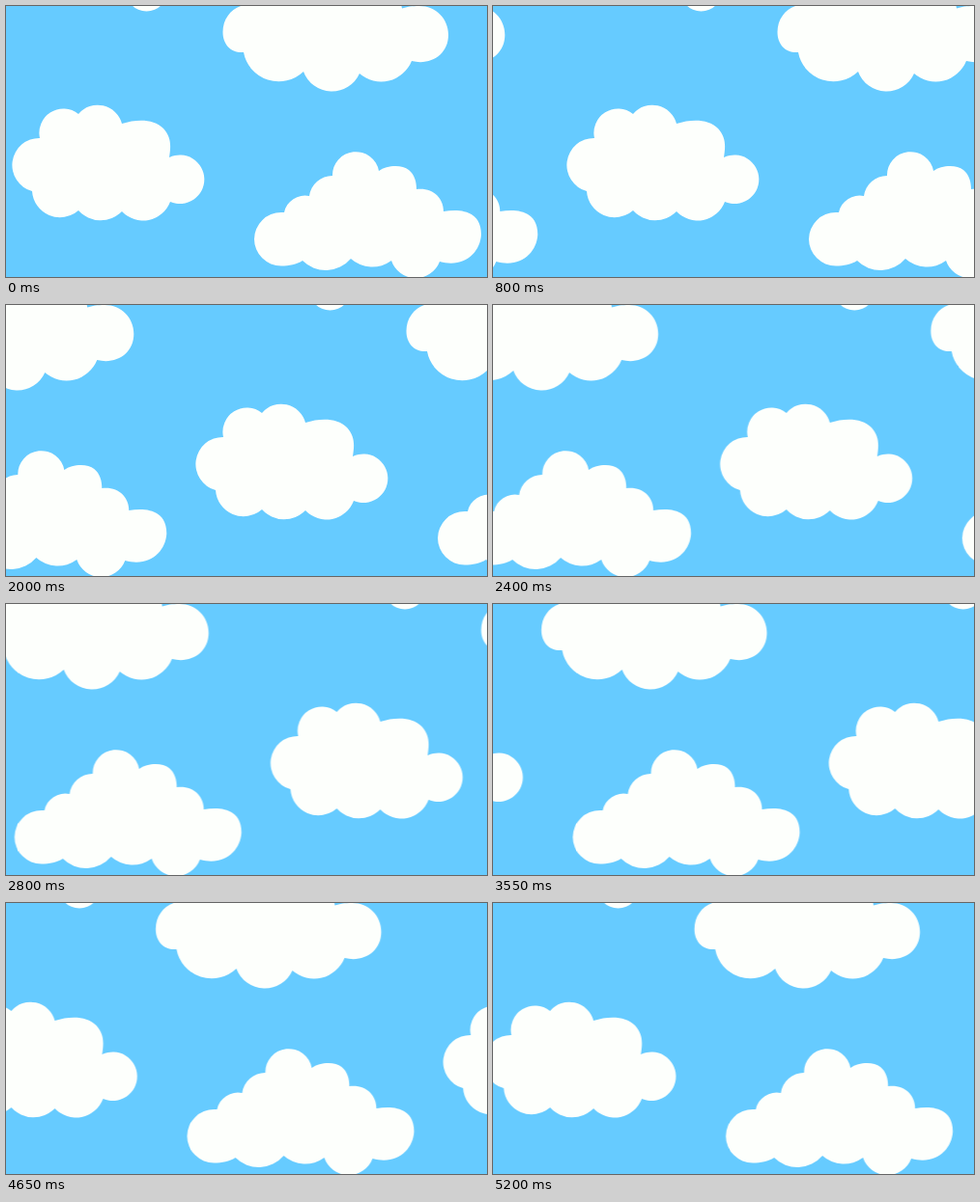
These frames come from a looping animation (498 by 281 pixels, 5250 ms). An HTML page:

```html
<!DOCTYPE html>
<html lang="en">
<head>
<meta charset="utf-8">
<title>Drifting clouds</title>
<style>
  html, body { margin: 0; width: 100%; height: 100%; overflow: hidden; background: #66cbff; }
  svg { display: block; width: 100vw; height: 100vh; }
  #sky { fill: #fdfffc; animation: drift 5250ms infinite; }

  /* One held position every 50 ms; percentages are rounded down. */
  @keyframes drift {
    0%       { transform: translateX(0);       animation-timing-function: steps(16, end); }
    15.238%  { transform: translateX(70px);    animation-timing-function: steps(24, end); }
    38.095%  { transform: translateX(190px);   animation-timing-function: steps(16, end); }
    53.333%  { transform: translateX(267.5px); animation-timing-function: steps(15, end); }
    67.619%  { transform: translateX(341.3px); animation-timing-function: steps(12, end); }
    79.047%  { transform: translateX(397.6px); animation-timing-function: steps(21, end); }
    99.047%, 100% { transform: translateX(499.7px); animation-timing-function: step-end; }
  }
</style>
</head>
<body>
<svg viewBox="0 0 498 281" preserveAspectRatio="none">
  <defs>
    <g id="clouds">
      <circle cx="145.5" cy="-16.5" r="22"/>
      <!-- top -->
      <path d="M243 -2V0C232 4 224.5 14 224.5 27C224.5 40 233 49 246 48
        A37 37 0 0 0 308 68A31.3 31.3 0 0 0 366 70A34 34 0 0 0 420 57
        C440 62 458 50 458 30C458 13 445 0 428 0C420 0 415 .8 410 2.5L409 -2Z"/>
      <!-- left -->
      <path d="M35 137A25 25 0 0 1 75 112A26 26 0 0 1 120 122
        C136 117 153 117 163 127C171 136 171 144 169 157
        A25.3 25.3 0 1 1 170 203A30 30 0 0 1 120 213A31 31 0 0 1 75 212
        A29 29 0 0 1 27 192A28 28 0 0 1 35 137Z"/>
      <!-- right -->
      <path d="M288 214A22 22 0 0 1 314 197A24 24 0 0 1 338 176A24.2 24.2 0 0 1 386 171
        C394 165 410 164 417 170C423 175 425 182 425 190C442 188 453 199 453 213
        C470 210 492 212 492 237C491 256 474 272 449 265
        A26.6 26.6 0 0 1 399 264A33 33 0 0 1 357 262A34 34 0 0 1 307 264
        C301 268 293 269.5 285 269.5A28 27.75 0 0 1 285 214Z"/>
    </g>
  </defs>
  <g id="sky">
    <use href="#clouds"/>
    <use href="#clouds" x="-515.7"/>
  </g>
</svg>
</body>
</html>
```
